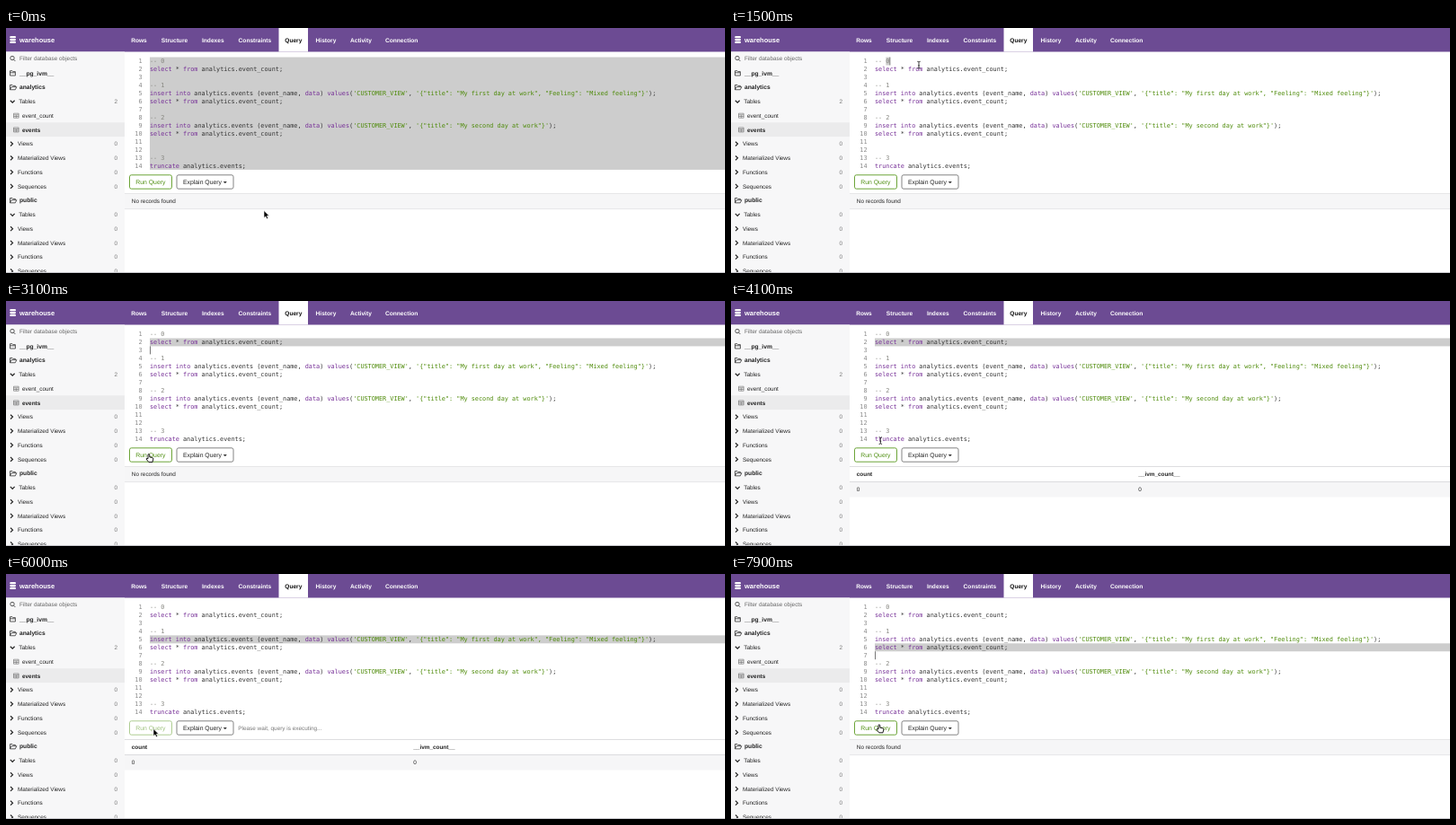
These frames come from a looping animation (800x273 px, 8 s). An HTML page:

```html
<!DOCTYPE html>
<html lang="en">
<head>
<meta charset="utf-8">
<title>Query console</title>
<style>
html, body { margin: 0; width: 100%; height: 100%; overflow: hidden; background: #fff; }
svg { display: block; width: 100%; height: 100%; }
text { font: 6.4px "Liberation Sans", Arial, sans-serif; fill: #222; white-space: pre; text-rendering: geometricPrecision; }
.b { font-weight: bold; }
.nav { font-size: 6.6px; font-weight: bold; fill: #fff; }
.num { fill: #777; text-anchor: end; }
.btn { font-size: 6.85px; }
.code, .line { font: 6.835px "DejaVu Sans Mono", monospace; fill: #333; }
.line { fill: #8a8a8a; text-anchor: end; }
.key { fill: #762f97; }
.str { fill: #4d8a08; }
.rem { fill: #85857f; }
.ico { fill: none; stroke: #333; stroke-width: .8; stroke-linejoin: round; }
.chev { fill: none; stroke: #222; stroke-width: 1.2; }
</style>
</head>
<body>
<svg viewBox="0 0 800 273" preserveAspectRatio="none">
  <g id="back"></g>
  <g id="marks"></g>
  <g id="front"></g>
  <g id="run">
    <rect x="137.5" y="163.8" width="47" height="15.4" rx="2" fill="none" stroke="#5c9a22" stroke-width=".9"/>
    <text class="btn" x="144.3" y="174" style="fill:#4f8f12">Run Query</text>
  </g>
  <text id="wait" x="258.3" y="173.6" style="fill:#777">Please wait, query is executing...</text>
  <g id="empty">
    <rect x="132" y="184.5" width="668" height="17" fill="#f6f6f7"/>
    <path d="M132 184.5H800M132 201.6H800" stroke="#dfdfe1" stroke-width=".7"/>
    <text x="139.8" y="195.2">No records found</text>
  </g>
  <g id="table">
    <rect x="132" y="201.5" width="668" height="17" fill="#f6f6f7"/>
    <path d="M132 184.5H800M132 201.5H800" stroke="#d5d5d8" stroke-width=".8"/>
    <text class="b" x="139.8" y="194.6">count</text>
    <text class="b" x="453.3" y="194.6">__ivm_count__</text>
    <text x="139.8" y="211.5">0</text>
    <text x="453.3" y="211.5">0</text>
  </g>
  <rect y="272" width="800" height="1" fill="#c9c9ce"/>
  <g id="mouse" stroke-linejoin="round">
    <path id="arrow" d="M0 0V8L1.9 6.4L3.2 9.2L4.6 8.6L3.4 5.8H5.8Z" fill="#000" stroke="#fff" stroke-width=".6"/>
    <path id="beam" d="M-1.7 -3.7Q0 -3.7 0 -2.8Q0 -3.7 1.7 -3.7M0 -2.8V3.2M-1.7 4Q0 4 0 3.1Q0 4 1.7 4M-.8 .9H.8" fill="none" stroke="#111" stroke-width=".8"/>
    <path id="hand" d="M-1 .6Q0 -.6 .8 .6V3.4L3.8 4Q5 4.3 4.8 5.6L4 9H-.2L-3 5.5Q-3 4.2 -1 5.2Z" fill="#fff" stroke="#000" stroke-width=".9"/>
  </g>
</svg>
<script>
const $ = id => document.getElementById(id);
const rect = (x, y, w, h, fill, more = '') =>
  `<rect x="${x}" y="${y}" width="${w}" height="${h}" fill="${fill}" ${more}/>`;
const text = (x, y, str, cls = '') => `<text class="${cls}" x="${x}" y="${y}">${str}</text>`;
const path = (d, cls) => `<path class="${cls}" d="${d}"/>`;

const CODE_X = 160, CHAR = 4.115, LINE = 8.96;
const lineY = n => 32.5 + (n - 1) * LINE;
const colX = c => CODE_X + c * CHAR;

const sql = [
  '-- 0', 'select * from analytics.event_count;', '',
  '-- 1',
  `insert into analytics.events (event_name, data) values('CUSTOMER_VIEW', '{"title": "My first day at work", "Feeling": "Mixed feeling"}');`,
  'select * from analytics.event_count;', '',
  '-- 2',
  `insert into analytics.events (event_name, data) values('CUSTOMER_VIEW', '{"title": "My second day at work"}');`,
  'select * from analytics.event_count;', '', '',
  '-- 3', 'truncate analytics.events;'
];
const paint = s => s.replace(/('[^']*')|(--.*)|\b(?:select|from|insert|into|data|values|truncate)\b/g,
  (m, str, rem) => `<tspan class="${str ? 'str' : rem ? 'rem' : 'key'}">${m}</tspan>`);

// Header and sidebar
let back = rect(0, 0, 800, 26.5, '#6c4b93') + rect(303.5, 0, 32.5, 26.5, '#fff')
  + rect(0, 26.5, 132, 246.5, '#f7f7f8') + rect(0, 105.3, 132, 15.8, '#ebebec');
for (const y of [9, 11.9, 14.8]) back += rect(4.2, y, 6.8, 2.3, '#fff', 'rx="1.1"');
back += '<text class="nav" style="font-size:7.5px" x="15" y="15.6">warehouse</text>';
[['Rows', 139.2], ['Structure', 172.8], ['Indexes', 218], ['Constraints', 258.6], ['Query', 310.3],
 ['History', 344.6], ['Activity', 383], ['Connection', 422]].forEach(([s, x]) =>
  back += s === 'Query' ? text(x, 15.5, s, 'nav" style="fill:#111') : text(x, 15.5, s, 'nav'));
back += path('M8.6 35.2L10.4 37M9.2 33.5A2.2 2.2 0 1 1 4.8 33.5A2.2 2.2 0 1 1 9.2 33.5', 'ico')
  + text(15, 36.4, 'Filter database objects', '" style="fill:#666');

const groups = ['Views', 'Materialized Views', 'Functions', 'Sequences'];
['+__pg_ivm__', '-analytics', 'Tables', '.event_count', '.events', ...groups, '-public', 'Tables', ...groups]
  .forEach((name, i) => {
    const y = 50.3 + i * 15.76, base = y + 2.3, label = name.slice(1);
    if (/^[+-]/.test(name)) {
      back += path(`M4.5 ${y + 2.7}V${y - 2.6}H7L7.8 ${y - 1.7}H10.4V${y - .5}`
        + (name[0] === '+' ? `V${y + 2.7}ZM4.5 ${y - .5}H10.4` : `M4.5 ${y + 2.7}L6 ${y - .4}H11.8L10.3 ${y + 2.7}Z`), 'ico')
        + text(15, base, label, 'b" style="font-size:6.7px');
    } else if (name[0] === '.') {
      back += path(`M8.5 ${y - 2.4}h5.6v5h-5.6zM8.5 ${y - .8}h5.6M8.5 ${y + .9}h5.6M11.3 ${y - .8}v3.4`, 'ico" style="stroke:#666;stroke-width:.6')
        + text(18, base, label, name === '.events' ? 'b' : '');
    } else {
      const open = name === 'Tables';
      back += path(open ? `M4.8 ${y - 1.1}L7.2 ${y + 1.4}L9.6 ${y - 1.1}` : `M5 ${y - 2.4}L7.5 ${y}L5 ${y + 2.4}`, 'chev')
        + text(open ? 14.2 : 13, base, name, '')
        + text(124, base, open && i < 5 ? 2 : 0, 'num');
    }
  });
$('back').innerHTML = back;

// Editor text and the second button
$('front').innerHTML = sql.map((s, i) => {
  const y = lineY(i + 1) + 6.9;
  return text(151.6, y, i + 1, 'line') + text(CODE_X, y, paint(s), 'code');
}).join('')
  + rect(190, 163.8, 63, 15.4, 'none', 'rx="2" stroke="#777" stroke-width=".9"')
  + text(197, 174, 'Explain Query', 'btn') + '<path d="M241.8 171h4l-2 2.2z" fill="#333"/>';

// Selection states: [from, first line, start column, end column, lines with the same word]
// No end column: whole lines; equal columns: caret only.
const marks = [
  [0, 1], [1500, 1, 3, 4], [1600, 1],
  [2400, 2, 12, 12], [2600, 2, 9, 13, [6, 10]], [2700, 2],
  [4800, 5, 11, 11], [4900, 5, 7, 11, [9]], [5000, 5],
  [7000, 6, 12, 12], [7200, 6, 9, 13, [2, 10]], [7400, 6]
];
// Mouse stops: time, x, y
const stops = [
  [0, 287, 203.5], [1400, 209, 41], [2000, 209, 41], [2300, 208, 46], [2800, 208, 46],
  [3100, 159, 170.5], [3900, 159, 170.5], [4700, 206, 74], [5000, 206, 74], [5700, 164, 172.5],
  [6300, 164, 172.5], [6800, 208, 82], [7500, 208, 82], [7900, 165, 167.8]
];
const within = (t, a, b) => t >= a && t < b;

function drawMarks(t, focused) {
  const [from, line, a, b, same = []] = marks.filter(m => m[0] <= t).pop();
  const whole = b === undefined, all = from === 0;
  let out = whole
    ? rect(CODE_X, lineY(line), 640, LINE * (all ? 14 : 1), '#cdcdcd')
    : rect(colX(a), lineY(line), (b - a) * CHAR, LINE, '#cdcdcd');
  for (const n of same)
    out += rect(colX(a), lineY(n) + .3, (b - a) * CHAR, LINE - .6, 'none', 'stroke="#c8c8ee" stroke-width=".7"');
  if (focused && !all)
    out += rect(whole ? CODE_X : colX(b), lineY(whole ? line + 1 : line), .8, LINE, '#555');
  $('marks').innerHTML = out;
}

function mouseAt(t) {
  const i = Math.max(1, stops.findIndex(s => s[0] >= t));
  const [t0, x0, y0] = stops[i - 1], [t1, x1, y1] = stops[i];
  const u = (t - t0) / (t1 - t0), e = u * u * (3 - 2 * u);
  return [x0 + (x1 - x0) * e, y0 + (y1 - y0) * e];
}

const show = (id, on) => $(id).style.display = on ? '' : 'none';

function draw(now) {
  const t = Math.floor(now % 8000 / 100) * 100;
  const busy = within(t, 3300, 3500) || within(t, 5900, 6200);
  const table = within(t, 3500, 6200);
  drawMarks(t, !within(t, 3300, 4800) && !within(t, 5900, 7000));
  show('wait', busy);
  show('table', table);
  show('empty', !table);
  $('run').style.opacity = busy ? .55 : 1;

  const [x, y] = mouseAt(t);
  const onRun = within(x, 137, 185) && within(y, 163, 180);
  const kind = onRun && !busy ? 'hand' : t >= 1500 && y < 158 ? 'beam' : 'arrow';
  for (const k of ['arrow', 'beam', 'hand']) show(k, k === kind);
  $('mouse').setAttribute('transform', `translate(${x} ${y})`);
  requestAnimationFrame(draw);
}
requestAnimationFrame(draw);
</script>
</body>
</html>
```
